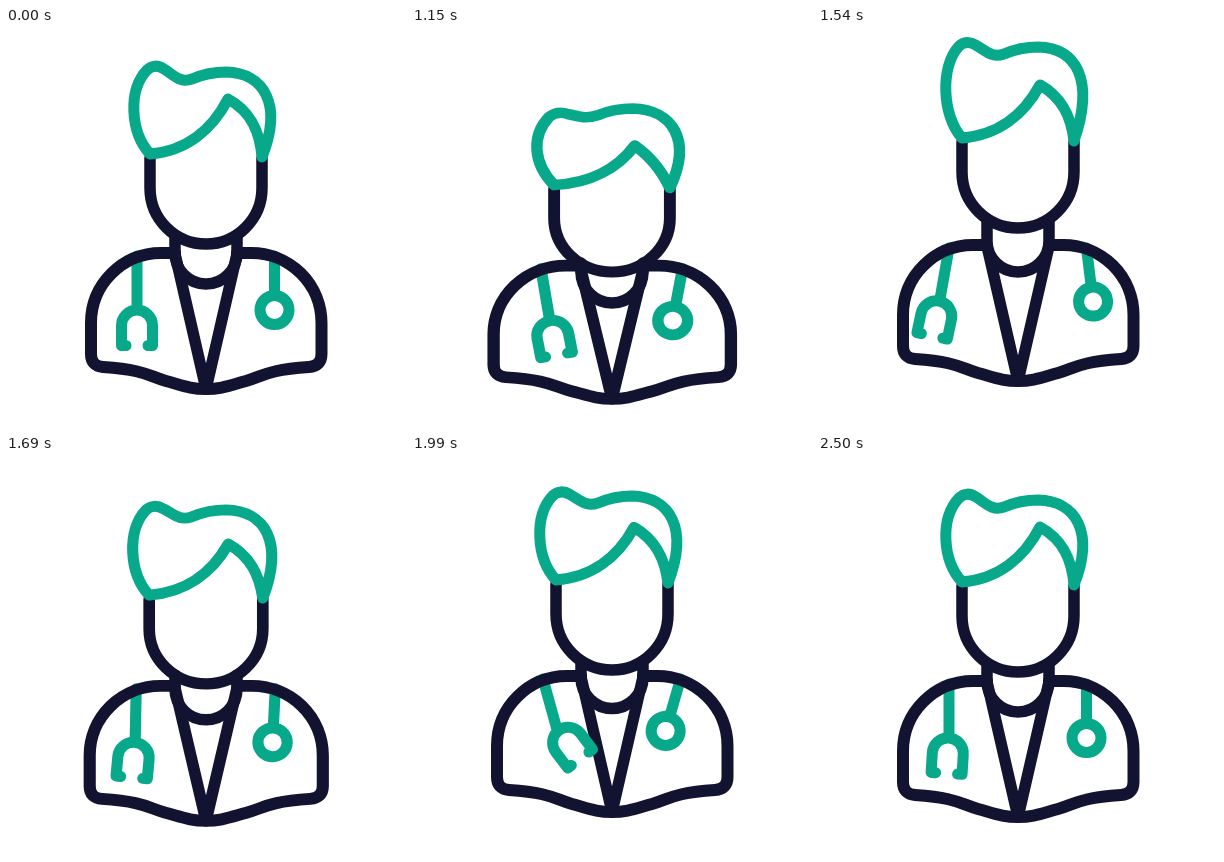
Write an HTML page with a canvas that moves like this. It is 400 px wide and 400 px high and loops after 2.53 s.

```html
<!DOCTYPE html>
<html lang="en">
<head>
<meta charset="utf-8">
<title>Doctor</title>
<style>
html, body { margin: 0; width: 100%; height: 100%; overflow: hidden; background: #fff; }
canvas { display: block; width: 100vmin; height: 100vmin; }
</style>
</head>
<body>
<canvas id="stage" width="400" height="400"></canvas>
<script>
const ctx = document.getElementById('stage').getContext('2d');
const INK = '#121331', GREEN = '#08a88a';
const LOOP = 2530, START = 1030, STEP = 30;

// time, body drop, head drop, hair lift, hair flatness, stem, fork and ring angles
const POSES = [
  [1000, 0, 0, 0, 0, 0, 0, 0],
  [1030, 4, 4, 0, 0, 0, 0, 0],
  [1170, 10, 29, -3, .7, 11, 13, 12],
  [1240, 4, 17, -2, 1, 17, 26, 17],
  [1300, -6, -2, 5, .6, 15, 37, 15],
  [1420, -12, -22, 9, .05, 2, 12, 3],
  [1540, -8, -16, 9, .08, -10, -12, -7],
  [1680, 3, 10, 5, .1, -2, -6, 2],
  [1790, 10, 29, -2, .6, 10, 9, 13],
  [1840, 9, 28, -4, 1, 13, 15, 16.5],
  [1920, 1, 12, -1, .6, 17, 28, 18],
  [1990, -5, -2, 2, .1, 15.5, 37, 16],
  [2060, -5, -7, 3, 0, 5, 16, 6],
  [2150, -1, -2, 1, 0, -5, -10, -4],
  [2250, 2, 2, -1, 0, -4, -8, -4],
  [2370, 0, 0, 0, 0, 2, 4, 2],
  [2500, 0, 0, 0, 0, 0, -3.5, 0]
];

// Tangent that stays flat at turning points
function slope(i, c) {
  const a = POSES[i - 1], b = POSES[i], d = POSES[i + 1];
  if (!a || !d || (b[c] - a[c]) * (d[c] - b[c]) <= 0) return 0;
  return (d[c] - a[c]) / (d[0] - a[0]);
}

function poseAt(t) {
  if (t < START) return POSES[0].slice(1);
  let i = 0;
  while (i < POSES.length - 2 && t >= POSES[i + 1][0]) i++;
  const a = POSES[i], b = POSES[i + 1], span = b[0] - a[0];
  const u = Math.min(1, (t - a[0]) / span), v = 1 - u;
  return a.slice(1).map((from, n) => {
    const c = n + 1;
    return from * v * v * (1 + 2 * u) + b[c] * u * u * (3 - 2 * u) +
      span * u * v * (slope(i, c) * v - slope(i + 1, c) * u);
  });
}

function stroke(d, color, width) {
  ctx.strokeStyle = color;
  ctx.lineWidth = width;
  ctx.stroke(new Path2D(d));
}

function group(draw) {
  ctx.save();
  draw();
  ctx.restore();
}

// Scale around a fixed point after a vertical shift
function squash(x, y, shift, sx, sy) {
  ctx.translate(x, y + shift);
  ctx.scale(sx, sy);
  ctx.translate(-x, -y);
}

function swing(x, y, degrees) {
  ctx.translate(x, y);
  ctx.rotate(-degrees * Math.PI / 180);
}

function drawStethoscope(stem, fork, ring) {
  group(() => {
    swing(131, 228, stem);
    stroke('M0 0V50', GREEN, 11);
    swing(0, 50, fork - stem);
    stroke('M-11 39.5H-15.5V19.5A15.5 15.5 0 0 1 15.5 19.5V39.5H11', GREEN, 11);
  });
  group(() => {
    swing(268.5, 228, -(-ring));
    stroke('M0 0V38M14.5 54A14.5 14.5 0 1 1 -14.5 54A14.5 14.5 0 1 1 14.5 54', GREEN, 11);
  });
}

function drawBody(drop, stem, fork, ring) {
  const k = .003 * Math.max(0, drop);
  const half = 'M169 225H155A70 70 0 0 0 85 295V326Q85 338 97 339' +
    'C140 342 142 348 160 353S185 361 200 361';
  const mirror = 'M231 225H245A70 70 0 0 1 315.5 295V326Q315.5 338 303 339' +
    'C260 342 258 348 240 353S215 361 200 361';
  group(() => {
    squash(200, 361, drop, 1 + k, 1 - .7 * k);
    stroke('M169 226L200 361L231 226', INK, 11.5);
    // The ring hangs toward the centre, opposite to the fork
    drawStethoscope(stem, fork, -ring);
    stroke(half + mirror, INK, 12);
  });
}

function drawNeck(body, head) {
  const top = 207 + head, y = 225 + (body + head) / 2;
  stroke(`M169 ${top}V${y}A31 31 0 0 0 231 ${y}V${top}`, INK, 11.5);
}

function drawHead(drop, lift, p) {
  const k = .0012 * Math.max(0, drop);
  const up = y => y - lift;
  const hair = `M144 126C124 104 ${122 - p} ${up(62 + 18 * p)} ${141 - 3 * p} ${up(42 + 18 * p)}
    C${146 - 2 * p} ${up(37 + 18 * p)} 152 ${up(37 + 18 * p)} 158 ${up(41 + 15 * p)}
    C169 ${up(48 + 7 * p)} 174 ${up(55)} 186 ${up(51)}
    C200 ${up(45)} 210 ${up(44)} 220 ${up(44)}
    C258 ${up(45)} ${277 + 2 * p} ${up(76)} 256 129
    C${254 - 9 * p} ${105 + 13 * p} ${246 - 12 * p} ${84 + 23 * p} 222 ${71 + 24 * p}
    C206 ${102 + 10 * p} 180 ${123 + 2 * p} 144 126Z`;
  group(() => {
    squash(200, 216, drop, 1 + k, 1 - k);
    stroke('M144 130V160A56 56 0 0 0 256 160V130', INK, 11.5);
    stroke(hair, GREEN, 11);
  });
}

function render(now) {
  const t = now % LOOP;
  const held = t < START ? 0 : START + Math.floor((t - START) / STEP) * STEP;
  const [body, head, lift, flat, stem, fork, ring] = poseAt(held);
  ctx.fillStyle = '#fff';
  ctx.fillRect(0, 0, 400, 400);
  ctx.lineJoin = ctx.lineCap = 'round';
  drawBody(body, stem, fork, ring);
  drawNeck(body, head);
  drawHead(head, lift, flat);
}

const begin = performance.now();
function tick() {
  render(performance.now() - begin);
  requestAnimationFrame(tick);
}
tick();
</script>
</body>
</html>
```
